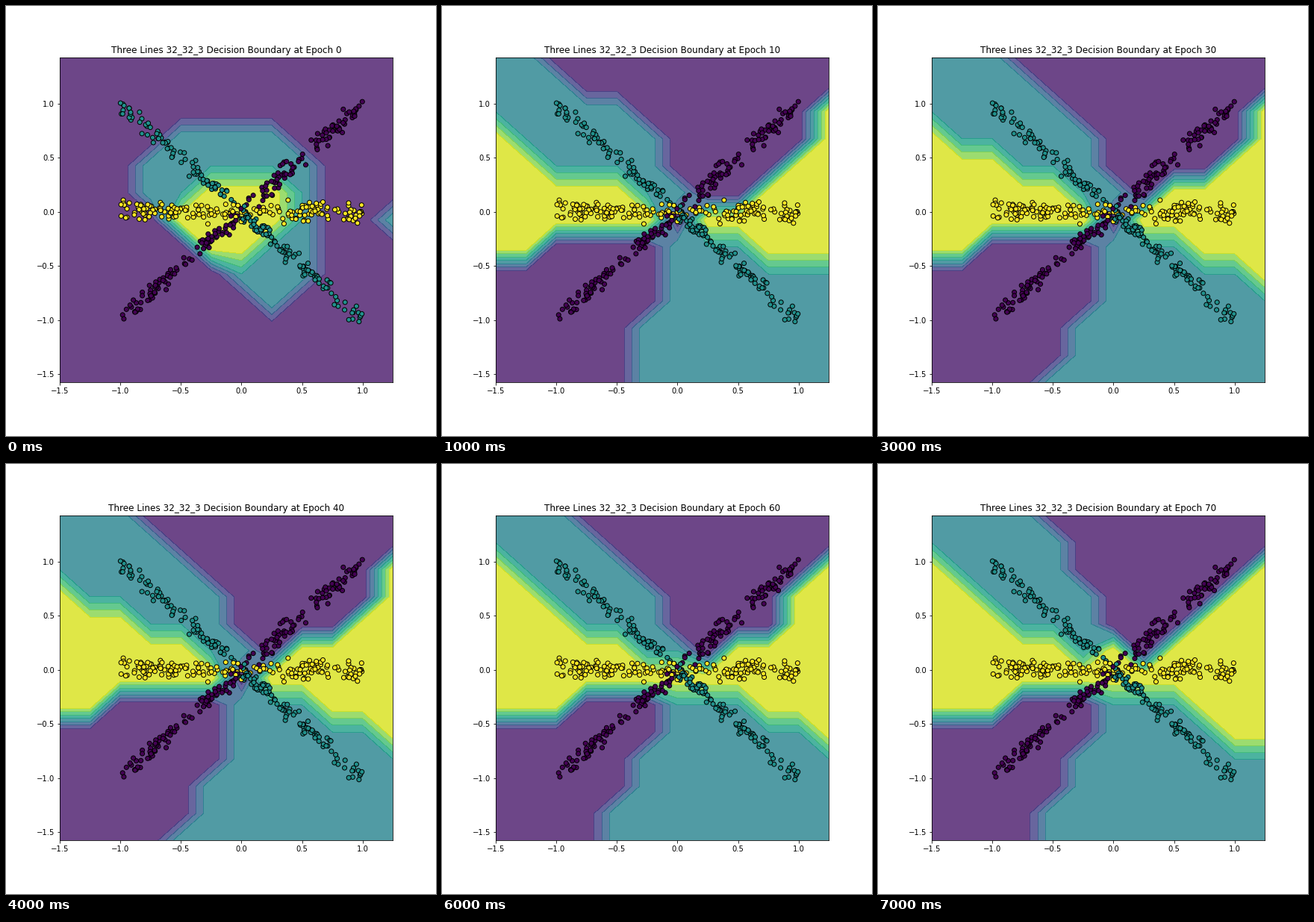
Animation, 576 px wide and 576 px high, one loop 8000 ms. Source, as a matplotlib script:

```python
import numpy as np
import matplotlib.pyplot as plt
from matplotlib.animation import FuncAnimation

EPOCHS = range(0, 80, 10)
STEP_MS = 1000
COLS, ROWS, MID = 12, 13, 6
PURPLE, TEAL, YELLOW = 0, 1, 2
PER_LINE = 195

gx = np.linspace(-1.5, 1.25, COLS)
gy = np.linspace(-1.573, 1.427, ROWS)
col, row = np.meshgrid(np.arange(COLS), np.arange(ROWS))
radius = np.hypot(*np.meshgrid(gx, gy))
upper = row > MID
# Rows away from the middle band, counted outwards.
dist = np.where(upper, row - MID - 1, MID - 1 - row)


def border(p, start, end):
    """Column of a curved border, its coefficients drifting as training goes on."""
    a, b, c = (1 - p) * np.array(start) + p * np.array(end)
    return np.floor(a + b * dist + c * dist ** 2)


def untrained():
    """One teal blob with a yellow core, cut by straight and diagonal edges."""
    rise, fall = col + row, col - row + .5
    blob = ((abs(rise - 13) <= 3) & (abs(fall) <= 4.5)
            & (abs(col - 5.5) <= 2.5) & (row <= 9))
    core = (abs(rise - 12) <= 2) & (abs(fall) <= 1.5) & (row <= 7)
    grid = np.where(core, YELLOW, np.where(blob, TEAL, PURPLE))
    grid[MID, -1] = TEAL
    return grid


def trained(p):
    """Wedges between a left, a middle and a right border; p runs from 0 to 1."""
    left = np.where(upper,
                    border(p, (5.1, -2.55, .3), (5.1, -1.715, .165)),
                    border(p, (2.3, -2.5, 0), (3.2, -2.5, 0)))
    middle = np.where(upper,
                      border(p, (7.6, -.6, -.08), (7.1, -.28, -.06)),
                      border(p, (6.95, -.37, 0), (6.6, -.24, -.055)))
    right = np.where(upper,
                     border(p, (9.05, 1.37, -.15), (8.83, 1.22, -.1)),
                     border(p, (9.3, 2.75, 0), (9.3, 1.6, 0)))
    grid = np.where((col < middle) == upper, TEAL, PURPLE)
    grid[(col < left) | (col >= right)] = YELLOW
    grid[MID] = YELLOW
    grid[MID, MID] = PURPLE
    grid[radius < .18 * p ** 3] = YELLOW
    return grid


def sample_points():
    rng = np.random.default_rng(4)
    label = rng.permutation(np.repeat([PURPLE, TEAL, YELLOW], PER_LINE))
    slope = np.array([1, -1, 0])[label]
    x = rng.uniform(-1, 1, label.size)
    y = slope * x + np.clip(rng.normal(0, .045, label.size), -.11, .11)
    return x, y, label


fig, ax = plt.subplots(figsize=(8, 8), dpi=72)
fig.subplots_adjust(left=.125, right=.9, bottom=.125, top=.88)
px, py, labels = sample_points()
ax.scatter(px, py, c=labels, s=36, cmap="viridis", edgecolors="k",
           linewidths=1, zorder=2)
title = ax.set_title("")
regions = None


def draw(epoch):
    global regions
    if regions is not None:
        regions.remove()
    grid = trained((epoch - 10) / 60) if epoch else untrained()
    regions = ax.contourf(gx, gy, grid, levels=np.linspace(0, 2, 9),
                          cmap="viridis", alpha=.8, zorder=1)
    ax.set_xlim(gx[0], gx[-1])
    ax.set_ylim(gy[0], gy[-1])
    title.set_text(f"Three Lines 32_32_3 Decision Boundary at Epoch {epoch}")
    return [title]


anim = FuncAnimation(fig, draw, frames=EPOCHS, interval=STEP_MS, repeat=True)
plt.show()
```
